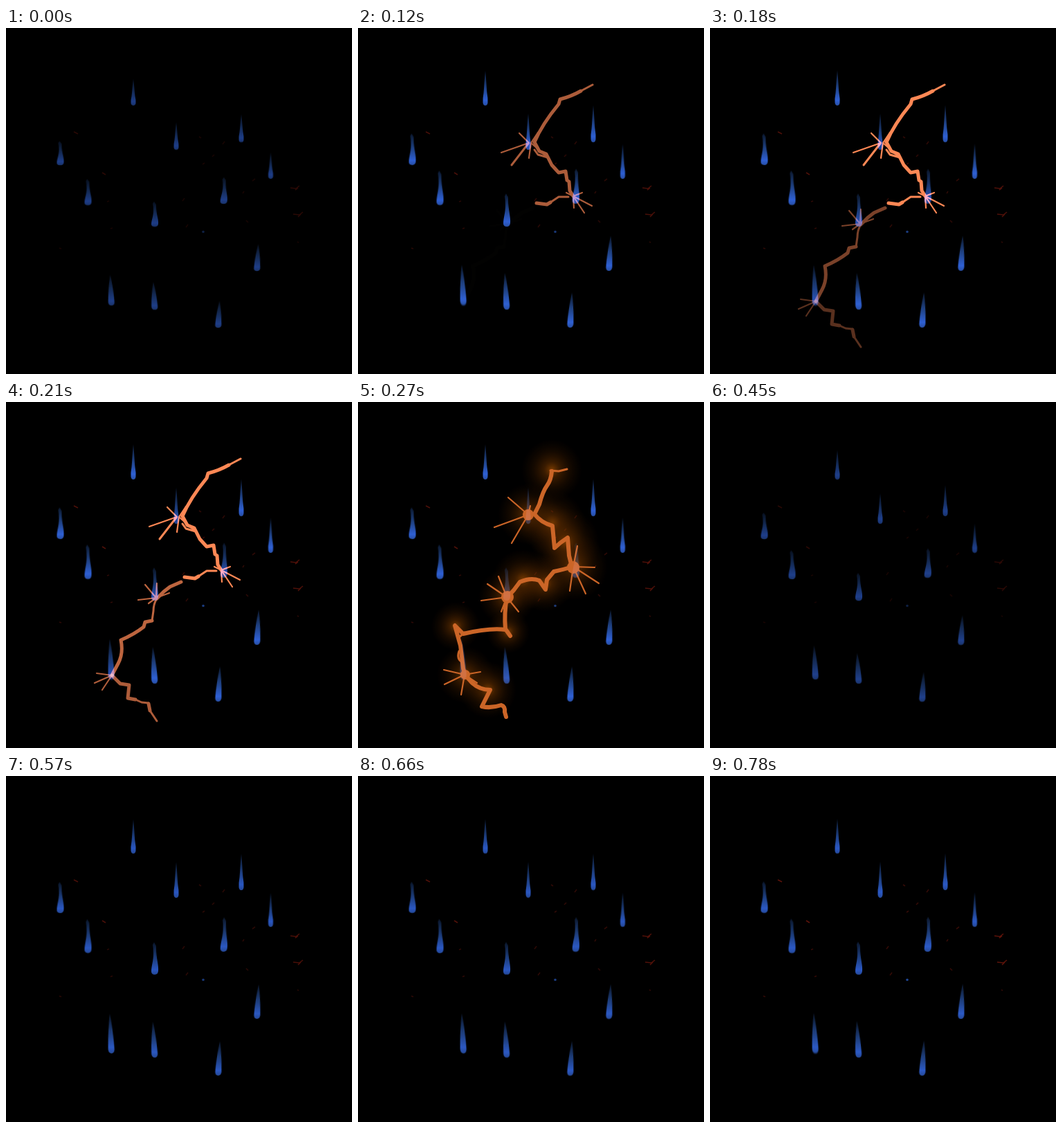
Write an HTML page without scripts that moves like this. It is 500x500 px and loops after 810 ms.

```html
<!DOCTYPE html>
<html lang="en">
<head>
<meta charset="utf-8">
<title>Rain and lightning</title>
<style>
  html, body { margin: 0; width: 100%; height: 100%; overflow: hidden; background: #000; }
  svg { display: block; width: 100%; height: 100%; }
  .drop, .struck, .specks, .bolt { animation: 810ms linear infinite; }
  .drop { animation-name: pulse; }
  .struck { animation-name: dip; }
  .specks { animation-name: glimmer; }
  .bolt { opacity: 0; stroke-linejoin: round; stroke-linecap: round; }
  .bolt path { fill: none; stroke-width: 5; }
  .bolt .thin { stroke-width: 3; }
  .bolt .rays { stroke-width: 2.2; }
  .first { stroke: #ff8855; mix-blend-mode: screen; }
  .second { stroke: #f67a30; animation-name: afterglow; }
  .second path { stroke-width: 6; }
  .top { animation-name: strike-top; }
  .middle { animation-name: strike-middle; }
  .bottom { animation-name: strike-bottom; }

  @keyframes pulse {
    0% { opacity: .64; transform: scaleY(.76); }
    15%, 41% { opacity: 1; transform: none; }
    55.56% { opacity: .66; transform: scaleY(.84); }
    70.37% { opacity: .91; transform: scaleY(.98); }
    100% { opacity: .94; transform: none; }
  }
  @keyframes dip {
    0%, 15% { opacity: 1; }
    22.22% { opacity: .85; }
    29.63%, 33.33% { opacity: .8; }
    40.74%, 100% { opacity: 1; }
  }
  @keyframes glimmer {
    0%, 55.56% { opacity: .4; }
    18%, 41% { opacity: .75; }
    70.37% { opacity: .7; }
    100% { opacity: .9; }
  }
  @keyframes strike-top {
    0%, 7.41% { opacity: 0; }
    18.52%, 29.62% { opacity: 1; }
    29.63%, 100% { opacity: 0; }
  }
  @keyframes strike-middle {
    0%, 14.81% { opacity: 0; }
    22.22% { opacity: .47; }
    29.62% { opacity: 1; }
    29.63%, 100% { opacity: 0; }
  }
  @keyframes strike-bottom {
    0%, 16% { opacity: 0; }
    22.22% { opacity: .34; }
    29.62% { opacity: 1; }
    29.63%, 100% { opacity: 0; }
  }
  @keyframes afterglow {
    0%, 29.62% { opacity: 0; }
    29.63% { opacity: 1; }
    33.33% { opacity: .84; }
    40.74% { opacity: .3; }
    48.15%, 100% { opacity: 0; }
  }
</style>
</head>
<body>
<svg viewBox="0 0 500 500">
  <defs>
    <linearGradient id="water" x2="0" y2="1">
      <stop offset="0" stop-color="#2c5cb0" stop-opacity=".25"/>
      <stop offset=".45" stop-color="#2c5cb8" stop-opacity=".7"/>
      <stop offset=".85" stop-color="#2f60d4"/>
      <stop offset="1" stop-color="#2c58b8" stop-opacity=".9"/>
    </linearGradient>
    <radialGradient id="halo">
      <stop offset="0" stop-color="#b85a00" stop-opacity=".8"/>
      <stop offset=".25" stop-color="#8a4200" stop-opacity=".5"/>
      <stop offset=".6" stop-color="#602c00" stop-opacity=".25"/>
      <stop offset="1" stop-color="#401c00" stop-opacity="0"/>
    </radialGradient>
    <filter id="soft" x="-50%" y="-10%" width="200%" height="120%"><feGaussianBlur stdDeviation=".7"/></filter>
    <g id="slim" fill="url(#water)" filter="url(#soft)">
      <path d="M0-51C1.500-38 1.500-28 2.500-18Q4-10 3.500-4 3 0 0 0T-3.500-4Q-4-10-2.500-18C-1.500-28-1.500-38 0-51Z"/>
    </g>
    <g id="wide" fill="url(#water)" filter="url(#soft)">
      <path d="M-1-49C1-44 2-46 2-40C2-25 6-15 5-6Q4.500-1 0-1T-5-5C-5-14-2-20-2-32Q-2-40-3-45Z"/>
    </g>
    <g id="long" fill="url(#water)" filter="url(#soft)">
      <path d="M0-52C2.500-40 4.500-16 4.500-6Q4-1 0-1T-4.500-6C-4.500-16-2.500-38 0-52Z"/>
    </g>
  </defs>

  <rect width="500" height="500"/>

  <g class="specks" filter="url(#soft)" fill="none" stroke="#6a160c" stroke-width="1.6">
    <path d="M98 150l6 3M139 209l5 3M411 231l8 1 5-4M418 234l4-3M415 269l9 1 5-4M422 273l4-4"/>
    <path stroke="#3c0d08" d="M279 157l3 2M313 168l3-4M298 186l3-3M284 197l3-2M356 221l4-3M342 239l2-3M255 250l3-4M260 288l3-4M347 278l3 3M146 251l3-1M151 290l3-1M421 309l2 1M77 318l3 1"/>
    <circle cx="285" cy="294.500" r="1.800" fill="#2450a8" stroke="none"/>
  </g>

  <g transform="translate(184 112)"><use class="drop" href="#slim"/></g>
  <g transform="translate(340 165) scale(1 1.06)"><use class="drop" href="#slim"/></g>
  <g transform="translate(382.500 218)"><use class="drop" href="#slim"/></g>
  <g transform="translate(78.500 199) scale(1 .96)"><use class="drop" href="#wide"/></g>
  <g transform="translate(118.500 257) scale(1 1.05)"><use class="drop" href="#wide"/></g>
  <g transform="translate(362.500 352) skewX(-3)"><use class="drop" href="#long"/></g>
  <g transform="translate(215 408) skewX(3) scale(1 1.04)"><use class="drop" href="#long"/></g>
  <g transform="translate(306.500 434) skewX(-3)"><use class="drop" href="#long"/></g>
  <g class="struck">
    <g transform="translate(246 176) scale(1 1.04)"><use class="drop" href="#slim"/></g>
    <g transform="translate(314.500 255) skewX(-2) scale(1 1.06)"><use class="drop" href="#wide"/></g>
    <g transform="translate(215 288)"><use class="drop" href="#wide"/></g>
    <g transform="translate(152.500 402) skewX(2.500) scale(1 1.15)"><use class="drop" href="#long"/></g>
  </g>

  <g class="bolt first top">
    <path class="thin" d="M339 82L322 91"/>
    <path d="M322 91Q308 99 292 103L290 110Q266 139 255 165"/>
    <path d="M255 165L262 178 272 182 280 198 290 209 300 207 302 220 305 222 306 235 311 243"/>
    <path class="thin" d="M255 176L260 183 274 187M304 244L290 244 278 252M222 198L246 167"/>
    <path d="M278 252L273 255 258 253"/>
    <path class="rays" d="M207 180L247 166 233 152M260 151L250 166 247 188M250 166L272 186"/>
    <path class="rays" d="M324 238L311 243 338 257M327 267L311 243 312 260M301 238L311 243"/>
  </g>
  <g class="bolt first middle">
    <path d="M253 260L237 267 228 274 218 284"/>
    <path class="thin" d="M218 284Q213 292 213 302L211 316"/>
    <path d="M211 316L201 318 199 325Q185 336 166 344Q170 363 162 378L153 395"/>
    <path class="rays" d="M191 286L217 283 201 264M218 262L217 283 236 276M206 291L217 283"/>
  </g>
  <g class="bolt first bottom">
    <path d="M153 395L165 407 178 409 176 428 187 430"/>
    <path class="thin" d="M187 430L196 434 206 435 208 446 218 461"/>
    <path d="M206 436L208 446"/>
    <path class="rays" d="M128 406L153 395 131 392M139 416L153 395"/>
  </g>

  <g class="bolt second">
    <g fill="url(#halo)" stroke="none">
      <circle cx="280" cy="98" r="45"/>
      <circle cx="246" cy="162" r="45"/>
      <circle cx="281" cy="175" r="48"/>
      <circle cx="300" cy="203" r="50"/>
      <circle cx="312" cy="238" r="50"/>
      <circle cx="270" cy="262" r="42"/>
      <circle cx="238" cy="257" r="45"/>
      <circle cx="215" cy="282" r="42"/>
      <circle cx="141" cy="324" r="36"/>
      <circle cx="217" cy="332" r="32"/>
      <circle cx="155" cy="394" r="42"/>
      <circle cx="188" cy="416" r="42"/>
    </g>
    <path class="thin" d="M302 97L290 100 278 99"/>
    <path d="M280 100Q279 113 273 121T262 148L255 162Q264 174 281 179L284 211Q292 203 303 196L305 222 309 238"/>
    <path d="M309 238Q298 242 283 245L273 257 271 271 262 258Q250 253 234 260L225 272 215 283Q211 305 213 328L220 338"/>
    <path d="M213 329Q190 326 152 335L140 323 148 352 152 385 155 395"/>
    <path d="M155 395L165 406Q176 416 191 416L179 440Q192 443 207 438Q213 440 212 448L214 455"/>
    <path class="thin" d="M146 340L154 333M146 360Q142 372 151 376"/>
    <path class="rays" d="M197 181L246 163 217 138M222 204L246 163M249 150L246 163"/>
    <path class="rays" d="M342 239L311 238 348 262M329 277L311 238 306 273M317 208L311 238"/>
    <path class="rays" d="M178 287L215 282 187 263M203 252L215 282 229 268M232 303L215 282 207 303"/>
    <path class="rays" d="M124 387L154 394 125 408M149 423L154 394 177 390M172 406L154 394 153 384"/>
    <g fill="#f67a30" stroke="none">
      <circle cx="246" cy="163" r="8"/>
      <circle cx="311" cy="239" r="9"/>
      <circle cx="216" cy="282" r="9"/>
      <circle cx="155" cy="394" r="7"/>
    </g>
  </g>
</svg>
</body>
</html>
```
